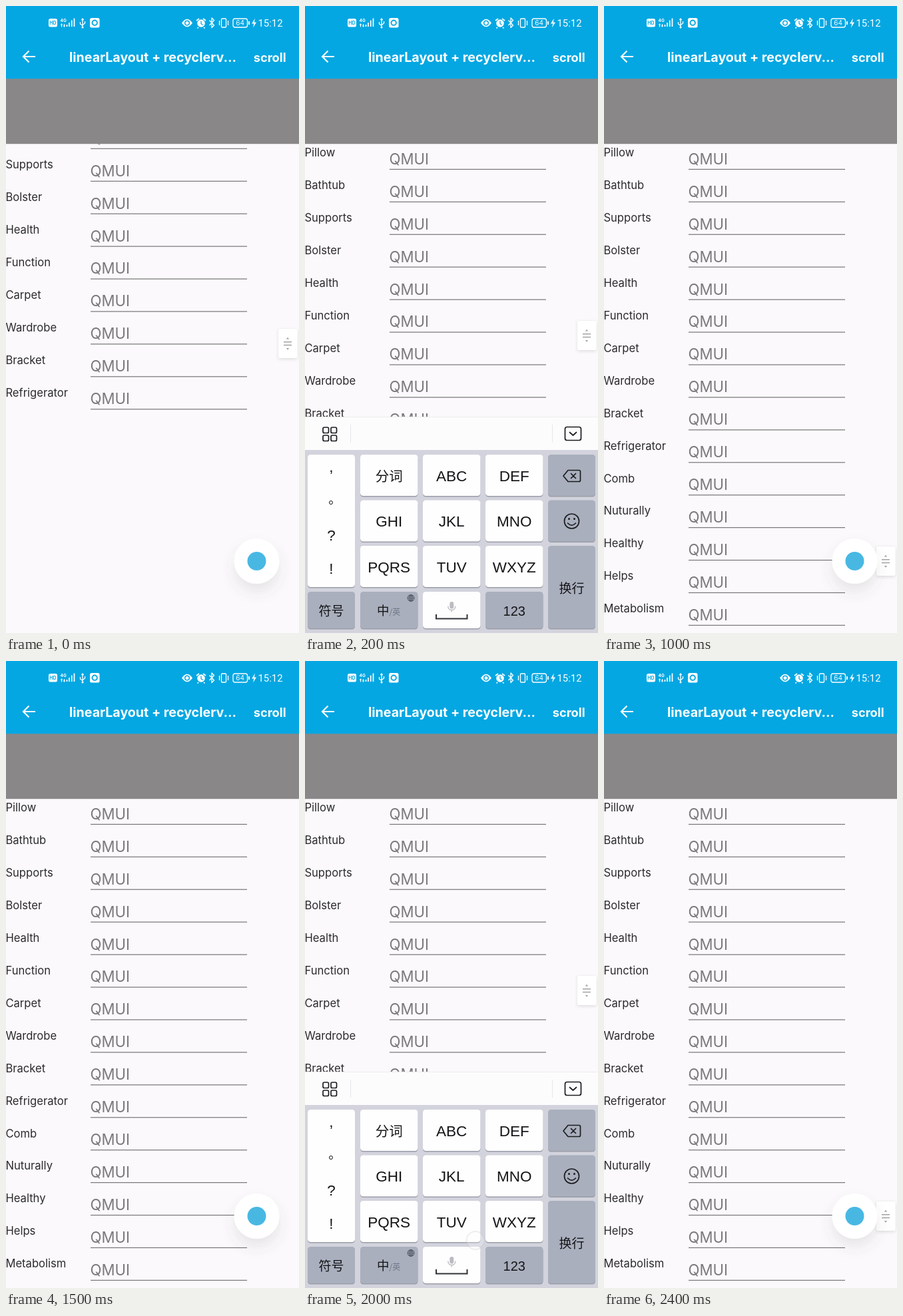
Write an HTML page that moves like this. It is 440 px wide and 942 px high and loops after 2500 ms.

```html
<!DOCTYPE html>
<html lang="en">
<head>
<meta charset="utf-8">
<title>Scrolling list with keyboard</title>
<style>
html, body { margin: 0; width: 100%; height: 100%; overflow: hidden; background: #fbf9fb; }
svg { display: block; width: 100vw; height: 100vh; }
text { font-family: Inter, "Noto Sans", sans-serif; }
.label { font-size: 16.6px; fill: #2b2a2c; }
.hint { font-size: 22.2px; fill: #7b797b; }
.bar { font-weight: 700; fill: #fff; text-anchor: middle; }
.key { font: 22.5px "Liberation Sans", Arial, sans-serif; fill: #151517; text-anchor: middle; }
.cjk { font-family: "Noto Sans CJK SC", "Noto Sans CJK", sans-serif; }
.line { fill: none; stroke: #1c1c20; stroke-width: 1.7; stroke-linecap: round; stroke-linejoin: round; }
.thin { fill: none; stroke: #fff; stroke-width: 1.3; stroke-linejoin: round; }
</style>
</head>
<body>
<svg viewBox="0 0 440 942" preserveAspectRatio="none">
  <defs>
    <clipPath id="view"><rect id="viewport" y="207" width="440" height="735"/></clipPath>
    <filter id="soft" x="-60%" y="-60%" width="220%" height="240%">
      <feDropShadow dx="0" dy="12" stdDeviation="10" flood-color="#555" flood-opacity=".12"/>
    </filter>
    <filter id="edge" x="-40%" y="-30%" width="180%" height="170%">
      <feDropShadow dx="0" dy="1.5" stdDeviation="2" flood-color="#444" flood-opacity=".16"/>
    </filter>
  </defs>
  <rect width="440" height="942" fill="#fbf9fb"/>
  <g clip-path="url(#view)"><g id="list"></g></g>

  <rect width="440" height="110" fill="#04a7e2"/>
  <rect y="109.3" width="440" height="97.9" fill="#8a8788"/>

  <g id="status">
    <rect x="64" y="19" width="13" height="12.5" rx="2.5" fill="#fff"/>
    <text x="70.5" y="28" font-size="7" font-weight="700" fill="#04a7e2" text-anchor="middle">HD</text>
    <text x="81.5" y="24" font-size="6.5" font-weight="700" fill="#fff">4G</text>
    <path d="M82 28h3M83.5 26.5v5M86 30h3M87.5 27v4.5" stroke="#fff" stroke-width="1.2"/>
    <path d="M91.5 31v-3M95 31v-6M98.7 31v-9.5M102.5 31v-12.5" stroke="#fff" stroke-width="1.7"/>
    <path class="thin" d="M115 33V19M111.5 24v3l3.5 2.5M118.5 23v3l-3.5 2.5M113.5 21l1.5-2 1.5 2"/>
    <circle cx="115" cy="32" r="1.5" fill="#fff"/>
    <rect x="126" y="18" width="14.5" height="14.5" rx="2.5" fill="#fff"/>
    <circle cx="133.2" cy="25.2" r="3.7" fill="none" stroke="#04a7e2" stroke-width="1.9"/>
    <path d="M264 25.5Q272 14 280 25.5Q272 37 264 25.5Z" fill="#fff"/>
    <circle cx="272" cy="25.5" r="3.3" fill="#fff" stroke="#04a7e2" stroke-width="1.5"/>
    <circle cx="293" cy="26" r="5.8" fill="#fff"/>
    <path d="M286 22l4-3M300 22l-4-3M289 32l-1.5 1.5M297 32l1.5 1.5" stroke="#fff" stroke-width="1.7"/>
    <path d="M293 22.5v4l2.5 2" fill="none" stroke="#04a7e2" stroke-width="1.3"/>
    <path class="thin" d="M305.5 21.5l7 7.5-3.5 3.5V18l3.5 3.5-7 7.5"/>
    <rect class="thin" x="323.5" y="19" width="7" height="13" rx="1"/>
    <path class="thin" d="M320.5 22v7M333.5 22v7"/>
    <rect class="thin" x="341" y="19" width="21.5" height="13" rx="3"/>
    <path d="M365 23v5" stroke="#fff" stroke-width="1.8"/>
    <text x="351.7" y="29.3" font-size="10" fill="#fff" text-anchor="middle">64</text>
    <path d="M374 18.5l-5 8h3.3l-1.3 6 5-8h-3.3z" fill="#fff"/>
    <text x="378.5" y="31" fill="#fff" style="font:14.9px Roboto,sans-serif">15:12</text>
  </g>
  <path d="M44 76H26M34.5 67.5L26 76l8.500 8.500" fill="none" stroke="#fff" stroke-width="2.2"/>
  <text class="bar" x="220.5" y="84" font-size="19.6">linearLayout + recyclerv...</text>
  <text class="bar" x="396.2" y="83.5" font-size="18.2">scroll</text>

  <g id="thumb">
    <rect x="409" y="-22" width="28.5" height="44" rx="3" fill="#fff" filter="url(#edge)"/>
    <path d="M417 -2.2h12M417 2.5h12" stroke="#a5a3a5" stroke-width="1.4"/>
    <path d="M420.8 -6.5l2.2-2.7 2.2 2.7zM420.8 7l2.2 2.7 2.2-2.7z" fill="#a5a3a5"/>
  </g>
  <g id="fab">
    <circle cx="376.5" cy="834" r="34" fill="#fff" filter="url(#soft)"/>
    <circle cx="376.5" cy="834" r="14" fill="#48b8e3"/>
  </g>

  <g id="keyboard">
    <rect y="617" width="440" height="50" fill="#fdfcfd"/>
    <path d="M0 617.5h440" stroke="#ececef"/>
    <rect y="667" width="440" height="275" fill="#d2d3dc"/>
    <path d="M68.5 629v27M371.5 629v27" stroke="#e6e5e8"/>
    <g id="grid"></g>
    <rect class="line" x="390.5" y="632.5" width="24" height="20" rx="3"/>
    <path class="line" d="M397.5 640.5l5 4.5 5-4.5"/>
    <g id="keys"></g>
    <text class="key" x="39.5" y="700">,</text>
    <text class="cjk" x="35.2" y="748" font-size="19" fill="#151517">。</text>
    <text class="key" x="39.5" y="803">?</text>
    <text class="key" x="39.5" y="853">!</text>
    <path class="line" d="M395 697.5h16.5q2 0 2 2v13q0 2-2 2H395l-7-8.5zM399.5 702.5l7 7M406.5 702.5l-7 7"/>
    <circle class="line" cx="400.5" cy="774" r="11"/>
    <path class="line" d="M394.5 777q6 6 12 0"/>
    <circle cx="396.5" cy="770.5" r="1.5" fill="#1c1c20"/>
    <circle cx="404.5" cy="770.5" r="1.5" fill="#1c1c20"/>
    <text class="cjk" x="108" y="915" font-size="18.5" font-weight="500" fill="#151517">中</text>
    <text class="cjk" x="126.5" y="915" font-size="12" fill="#6f7684">/英</text>
    <g fill="none" stroke="#4a505c" stroke-width=".9">
      <circle cx="159" cy="889.5" r="5"/>
      <ellipse cx="159" cy="889.5" rx="2.3" ry="5"/>
      <path d="M154 889.5h10M159 884.5v10M155 886.7h8M155 892.3h8"/>
    </g>
    <rect x="217.3" y="895" width="6" height="10.5" rx="3" fill="#bbbcc2"/>
    <path d="M214.8 901.5q0 6 5.5 6t5.5-6M220.3 907.5v3" fill="none" stroke="#bbbcc2" stroke-width="1.3"/>
    <path d="M197 914v6.5h46.5V914" fill="none" stroke="#33343a" stroke-width="2"/>
  </g>
  <circle id="touch" cx="256" cy="870.5" r="13.5" fill="#fff" fill-opacity=".75" stroke="#c9c8d2" stroke-width="2"/>
</svg>
<script>
const LOOP = 2500, TOP = 207, PITCH = 48.93;
const $ = id => document.getElementById(id);

function add(parent, tag, attrs, text) {
  const el = document.createElementNS("http://www.w3.org/2000/svg", tag);
  for (const name in attrs) el.setAttribute(name, attrs[name]);
  if (text) el.textContent = text;
  parent.append(el);
  return el;
}

const names = ["Pillow", "Bathtub", "Supports", "Bolster", "Health", "Function", "Carpet", "Wardrobe",
  "Bracket", "Refrigerator", "Comb", "Nuturally", "Healthy", "Helps", "Metabolism"];
names.forEach((name, i) => {
  const y = TOP + i * PITCH;
  add($("list"), "text", { class: "label", x: -0.6, y: y + 19.2 }, name);
  add($("list"), "text", { class: "hint", x: 126.5, y: y + 30.8 }, "QMUI");
  add($("list"), "rect", { x: 127, y: y + 37.8, width: 235, height: 1.2, fill: "#777577" });
});

for (let i = 0; i < 4; i++) {
  add($("grid"), "rect", {
    class: "line", x: 27 + (i % 2) * 12, y: 633 + (i >> 1) * 12, width: 8.5, height: 8.5, rx: 2
  });
}

function key(x, y, w, h, fill, text, size, cjk) {
  add($("keys"), "rect", { x, y: y + 1.5, width: w, height: h, rx: 4.5, fill: "#9b9da8" });
  add($("keys"), "rect", { x, y, width: w, height: h, rx: 4.5, fill });
  if (text) {
    const base = y + h / 2 + (cjk ? 8.5 : 8.8);
    const label = add($("keys"), "text", { class: "key", x: x + w / 2, y: base }, text);
    label.style.fontSize = size + "px";
    if (cjk) label.style.fontFamily = '"Noto Sans CJK SC", "Noto Sans CJK", sans-serif';
  }
}

const WHITE = "#fefefe", GREY = "#a9afbd";
key(4, 674, 71, 199, WHITE);
["分词", "ABC", "DEF", "GHI", "JKL", "MNO", "PQRS", "TUV", "WXYZ"].forEach((text, i) =>
  key(83 + (i % 3) * 94, 674 + Math.floor(i / 3) * 68.5, 86.5, 62, WHITE, text, i ? 22.5 : 20.5, !i));
key(365, 674, 71, 62, GREY);
key(365, 742.5, 71, 62, GREY);
key(365, 811, 71, 124, GREY, "换行", 19, true);
key(4, 880, 71, 55, GREY, "符号", 19, true);
key(83, 880, 86.5, 55, GREY);
key(177, 880, 86.5, 55, WHITE);
key(271, 880, 86.5, 55, GREY, "123", 20);

const clamp = v => Math.max(0, Math.min(1, v));
const show = (id, on) => $(id).setAttribute("visibility", on ? "visible" : "hidden");

function draw(t) {
  const shifted = t < 100;
  const typing = (t >= 100 && t < 500) || (t >= 2000 && t < 2300);
  const thumbY = shifted ? 507 : typing ? 495 : 834;
  const thumbAlpha = t >= 500 && t < 2000 ? 1 - clamp((t - 1250) / 150) : 1;
  const touchAlpha = t < 1750 ? 0 : t < 2000 ? 1 : 0.3 * (1 - clamp((t - 2000) / 200));

  $("list").setAttribute("transform", `translate(0 ${shifted ? -80 : 0})`);
  $("viewport").setAttribute("height", (shifted || typing ? 617 : 942) - TOP);
  $("thumb").setAttribute("transform", `translate(0 ${thumbY})`);
  $("thumb").setAttribute("opacity", thumbAlpha);
  $("touch").setAttribute("opacity", touchAlpha);
  show("keyboard", typing);
  show("fab", !typing);
}

const start = performance.now();
function tick() {
  draw((performance.now() - start) % LOOP);
  requestAnimationFrame(tick);
}
tick();
</script>
</body>
</html>
```
